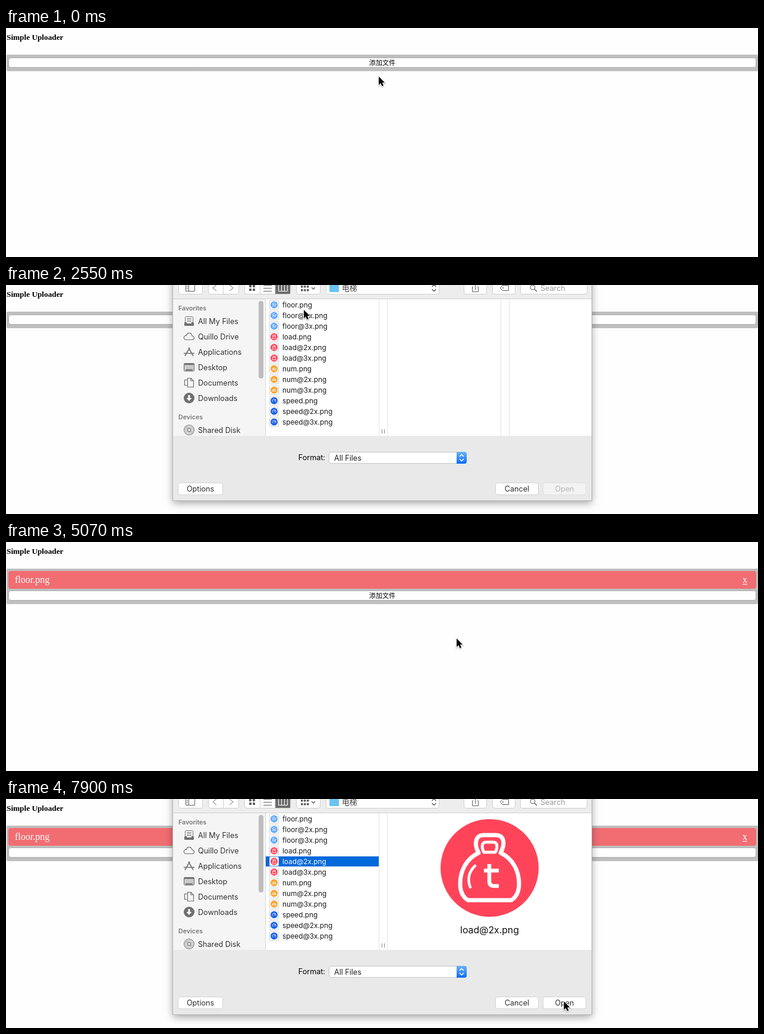
Animation of 1265x387 px, one loop 8000 ms. Source, as an HTML page with a canvas:

```html
<!DOCTYPE html>
<html lang="en">
<head>
<meta charset="utf-8">
<title>Simple Uploader</title>
<style>
html, body { margin: 0; width: 100%; height: 100%; overflow: hidden; background: #fefefe; }
canvas { display: block; }
</style>
</head>
<body>
<canvas id="stage" width="1265" height="387"></canvas>
<script>
const ctx = document.getElementById('stage').getContext('2d');
const LOOP = 8000;
const UI = 'Inter, sans-serif', SERIF = '"Liberation Serif", serif', CJK = '"Noto Sans CJK SC", "Noto Sans CJK", sans-serif';
const BLUE = '#62a9fb', RED = '#ff4459', ORANGE = '#f5a532', NAVY = '#1e62e6';

const FILES = ['floor', 'load', 'num', 'speed'].flatMap((name, i) =>
  ['', '@2x', '@3x'].map(scale => ({ name: name + scale + '.png', color: [BLUE, RED, ORANGE, NAVY][i], kind: i })));

// Pointer tip: time, x, y
const POINTER = [
  [0, 627, 82], [450, 631, 64], [600, 632.5, 57],
  [2100, 620, 58], [2250, 560, 56], [2400, 508, 49], [2550, 501, 42], [2690, 495, 36],
  [3140, 530, 60], [3290, 690, 190], [3430, 860, 300], [3580, 944, 338], [3720, 935, 340],
  [4770, 915, 325], [4920, 850, 265], [5070, 758, 163], [5220, 665, 110], [5370, 639, 93],
  [6560, 625, 95], [6710, 560, 102], [6860, 505, 104],
  [7310, 530, 125], [7460, 680, 225], [7610, 850, 315], [7760, 944, 342], [7900, 938.5, 342]
];
// Dialog offset from rest; null while closed
const SHEET = [
  [0, null], [1500, -361], [1650, -118], [1800, 0], [4320, -150], [4470, -368], [4620, null],
  [5960, -361], [6110, -118], [6260, 0]
];
const at = (keys, t) => keys.findLast(k => k[0] <= t);
const within = (t, a, b) => t >= a && t < b;

function text(str, x, y, size, color, { font = UI, weight = 400, align = 'left' } = {}) {
  ctx.font = `${weight} ${size}px ${font}`;
  ctx.textAlign = align;
  ctx.fillStyle = color;
  ctx.fillText(str, x, y);
}

function rect(x, y, w, h, fill) {
  ctx.fillStyle = fill;
  ctx.fillRect(x, y, w, h);
}

function box(x, y, w, h, r, fill, stroke) {
  ctx.beginPath();
  ctx.roundRect(x, y, w, h, r);
  if (fill) { ctx.fillStyle = fill; ctx.fill(); }
  if (stroke) { ctx.strokeStyle = stroke; ctx.lineWidth = 1; ctx.stroke(); }
}

function disc(x, y, r, fill) {
  ctx.beginPath();
  ctx.arc(x, y, r, 0, Math.PI * 2);
  ctx.fillStyle = fill;
  ctx.fill();
}

function stroke(path, color, width = 1) {
  ctx.strokeStyle = color;
  ctx.lineWidth = width;
  ctx.stroke(new Path2D(path));
}

function shifted(x, y, draw, scale = 1) {
  ctx.save();
  ctx.translate(x, y);
  ctx.scale(scale, scale);
  draw();
  ctx.restore();
}

function vertical(y, h, ...colors) {
  const g = ctx.createLinearGradient(0, y, 0, y + h);
  colors.forEach((c, i) => g.addColorStop(i / (colors.length - 1), c));
  return g;
}

function chevrons(x, y, color) {
  stroke(`M${x - 3.5} ${y - 2}l3.5 -3.5l3.5 3.5M${x - 3.5} ${y + 2}l3.5 3.5l3.5 -3.5`, color, 1.5);
}

function page(blue, uploaded) {
  rect(0, 0, 1265, 387, '#fefefe');
  text('Simple Uploader', 1, 20, 13.28, '#000', { font: SERIF, weight: 700 });
  box(1, 45, 1264, uploaded ? 60 : 28, 2, '#bfbfbf');
  if (uploaded) {
    box(4, 49, 1258, 30, 4, '#f16d72');
    text('floor.png', 15, 69, 16, '#fff', { font: SERIF });
    text('x', 1239, 69, 16, '#fff', { font: SERIF });
    rect(1239, 71, 8, 1, '#fff');
  }
  const y = uploaded ? 82 : 50;
  const fill = blue ? vertical(y, 17, '#4b9dfb', '#1a7bfa', '#0059e4') : '#fff';
  box(4.5, y + .5, 1257, 16, 3.5, fill, blue ? '#1564d6' : '#b0b0b0');
  text('添加文件', 633, y + 13, 11.1, '#000', { font: CJK, align: 'center' });
}

function sidebarIcon(kind, y) {
  const c = '#6f6f6f';
  shifted(308, y, () => {
    if (kind === 0) {
      box(-6.5, -7.5, 13, 12, 1, '#fff', c);
      stroke('M-4 -4.5H4M-4 -2H4M-4 .5H4', c);
      box(-8, 2, 16, 6, 1, c);
      rect(-4, 2, 8, 2, '#f5f5f5');
    } else if (kind === 1) {
      stroke('M-5 5.5H5.5C10 5 9 -1 5 -1C4 -7 -4 -7 -4.5 -1.5C-10 -2 -10 5.5 -5 5.5Z', c, 1.2);
    } else if (kind === 2) {
      stroke('M-7 7L1 -7M-1 -7L7 7M-9 2.5H9', c, 1.6);
    } else if (kind === 3) {
      box(-8.5, -6.5, 17, 13, 1, '#c9c9c9', c);
      rect(-8, -6, 16, 2, c);
      stroke('M-6 4.5H6', c, 2);
    } else if (kind === 4) {
      stroke('M-7.5 -4.5H-2V4.5H-7.5Z', c, 1.2);
      ctx.fillStyle = '#f5f5f5';
      ctx.fill(new Path2D('M-2.5 -7.5H3L7.5 -3V7.5H-2.5Z'));
      stroke('M-2.5 -7.5H3L7.5 -3V7.5H-2.5ZM3 -7V-3H7', c, 1.2);
    } else if (kind === 5) {
      disc(0, 0, 9, c);
      stroke('M0 -5V1', '#fff', 3);
      ctx.fillStyle = '#fff';
      ctx.fill(new Path2D('M-4.5 0H4.5L0 5Z'));
    } else {
      disc(0, 0, 9, '#7d7d7d');
      disc(0, 0, 8, '#d2d2d2');
      stroke('M-6 -4L6 4M-4 -6L4 6', '#b4b4b4');
      disc(0, 0, 3.2, '#7d7d7d');
      disc(0, 0, 2, '#f3f3f3');
    }
  });
}

function sidebar() {
  rect(281, 24, 155, 231, '#f5f5f5');
  rect(436, 24, 1, 231, '#d6d6d6');
  const head = { weight: 600 };
  text('Favorites', 290, 43, 10.6, '#777', head);
  text('Devices', 290, 227, 10.6, '#777', head);
  ['All My Files', 'Quillo Drive', 'Applications', 'Desktop', 'Documents', 'Downloads', 'Shared Disk'].forEach((name, i) => {
    const y = i < 6 ? 61 + 26 * i : 245;
    sidebarIcon(i, y);
    text(name, 323, y + 5, 12.6, '#333');
  });
  box(425, 27, 8, 131, 4, '#bdbdbd');
}

function toolbar(active) {
  const ink = active ? '#606060' : '#b5b5b5', edge = active ? '#cfcfcf' : '#dedede';
  const face = active ? '#fff' : '#f7f7f7';
  rect(281, -12, 704, 35, active ? '#ededed' : '#f6f6f6');
  rect(281, 23, 704, 1, '#d0d0d0');
  [[290, 40], [340, 51], [401, 77], [488, 40], [538, 190], [770, 38], [818, 38], [865, 112]]
    .forEach(([x, w]) => box(x + .5, -6.5, w, 22, 3.5, face, edge));
  rect(453, -6, 25, 21, active ? '#6c6c6c' : '#e2e2e2');
  stroke('M365.5 -6V15M427.5 -6V15', edge);
  stroke('M302.5 -1.5H317.5V10.5H302.5ZM307.5 -1V10M304 2.5H306M304 5.5H306', ink);
  stroke('M354 0L348 5L354 10M376 0L382 5L376 10', active ? '#a5a5a5' : ink, 1.4);
  for (const x of [409, 415]) for (const y of [0, 6]) rect(x, y, 4, 4, ink);
  stroke('M433 .5H447M433 5.5H447M433 10.5H447', ink);
  stroke('M458.5 -.5H473.5V10.5H458.5ZM463.5 0V10M468.5 0V10', active ? '#fff' : ink);
  for (const x of [496, 501, 506]) for (const y of [1, 7]) rect(x, y, 3.5, 3.5, ink);
  stroke('M514 4l3 3l3 -3', ink, 1.4);
  box(544, -2, 7, 5, 1, '#4fb3e6');
  box(544, 0, 16, 12, 1, active ? '#69c4f2' : '#79cbf4');
  text('电梯', 565, 10, 12.8, active ? '#444' : '#a0a0a0', { font: CJK });
  chevrons(720, 5, ink);
  stroke('M786 3H784.5V11.5H794.5V3H793M789.5 8V-3M786.5 0l3 -3l3 3', ink);
  stroke('M831.5 5L835 .5H845.5V9.5H835Z', ink);
  disc(836, 5, 1, ink);
  ctx.beginPath();
  ctx.arc(886, 4, 4, 0, 7);
  ctx.stroke();
  stroke('M889 7l4 4', ink, 1.5);
  text('Search', 899, 10, 12.6, active ? '#999' : '#bdbdbd');
}

function fileIcon(file, y) {
  box(443.5, y - 7.5, 15, 15, 1, '#fff', '#cfcfcf');
  disc(451, y, 6, file.color);
  const marks = ['M-2 3V-3H1M-2 0H1M4 -1H2V2H0', 'M-2 -1V-3H2V-1L3 3H-3L-2 -1H2', 'M-3 2V0H3V2ZM-1.5 -1.5H1.5', 'M-2.5 2A3 3 0 1 1 2.5 2M0 1L2 -2'];
  shifted(451, y, () => stroke(marks[file.kind], 'rgba(255,255,255,.8)', 1));
}

function floorArt() {
  const path = 'M823 63H785V138M785 99H820M878 97H843V132H804V169H768';
  disc(813.5, 116.5, 82.5, BLUE);
  ctx.lineJoin = 'miter';
  stroke(path, 'rgba(255,255,255,.25)', 12);
  stroke(path, 'rgba(255,255,255,.55)', 8);
  stroke(path, '#fff', 4.5);
}

function loadArt() {
  disc(813.5, 116.5, 82.5, RED);
  ctx.lineJoin = ctx.lineCap = 'round';
  stroke('M795 91C786 74 791 61 803 61H824C837 61 841 74 832 91C853 101 863 122 863 143C863 157 858 166 850 171H777C769 166 764 157 764 143C764 122 774 101 795 91Z', '#fff', 7);
  stroke('M804 90C799 81 801 73 807 73H820C826 73 828 81 823 90Z', '#fff', 5);
  stroke('M789 113C778 123 776 137 781 149', '#fff', 4.5);
  ctx.lineCap = 'butt';
  stroke('M813 110V139Q813 147 821 147H829M804 121H829', '#fff', 6.5);
}

function browser(active, selected) {
  rect(437, 24, 548, 231, '#fff');
  const hasFile = selected >= 0;
  (hasFile ? [627, 641] : [627, 641, 832, 846]).forEach(x => rect(x, 24, 1, 231, '#e4e4e4'));
  rect(632, 244, 1, 7, '#858585');
  rect(636, 244, 1, 7, '#858585');
  if (!active) return;
  FILES.forEach((file, i) => {
    const y = 33.5 + 18 * i;
    if (i === selected) rect(437, y - 8.5, 190, 17, '#0068da');
    fileIcon(file, y);
    text(file.name, 465, y + 4.5, 11.8, i === selected ? '#fff' : '#1c1c1c');
  });
  if (hasFile) {
    ctx.save();
    (selected ? loadArt : floorArt)();
    ctx.restore();
    text(FILES[selected].name, 813.5, 227, 15.8, '#111', { align: 'center' });
  }
}

function button(label, x, w, enabled, pressed) {
  box(x + .5, 334.5, w, 20, 3.5, pressed ? '#e1e1e1' : enabled ? '#fff' : '#f3f3f3', pressed ? '#dadada' : enabled ? '#d4d4d4' : '#e0e0e0');
  text(label, x + w / 2 + .5, 349, 12.6, enabled ? '#2c2c2c' : '#b5b5b5', { align: 'center' });
}

function dialog(offset, active, selected, pressed) {
  shifted(0, offset, () => {
    ctx.save();
    ctx.shadowColor = 'rgba(0,0,0,.38)';
    ctx.shadowBlur = 13;
    ctx.shadowOffsetY = 4;
    rect(281, -60, 704, 424, '#e9e9e9');
    ctx.restore();
    sidebar();
    browser(active, selected);
    rect(281, 255, 704, 109, '#e9e9e9');
    toolbar(active);
    ctx.strokeStyle = '#b4b4b4';
    ctx.lineWidth = 1;
    ctx.strokeRect(280.5, -60.5, 705, 425);

    text('Format:', 537, 296, 12.6, '#000', { align: 'right' });
    box(543.5, 282.5, 231, 19, 3.5, '#fff', '#c6c6c6');
    text('All Files', 552, 297, 12.6, '#222');
    if (active) box(758, 282, 17, 20, [0, 4, 4, 0], vertical(282, 20, '#6bb2fa', '#0a6df5'));
    chevrons(766.5, 292, active ? '#fff' : '#444');
    button('Options', 289, 75, active);
    button('Cancel', 823, 72, active);
    button('Open', 903, 72, active && selected >= 0, pressed);
  });
}

function pointer(x, y) {
  const arrow = new Path2D('M0 0V14.2L3.2 11.2L5.5 16.3L8 15.2L5.8 10.3H10.2Z');
  shifted(x, y, () => {
    ctx.save();
    ctx.shadowColor = 'rgba(0,0,0,.35)';
    ctx.shadowBlur = 2;
    ctx.shadowOffsetY = 1;
    ctx.strokeStyle = '#fff';
    ctx.lineWidth = 2;
    ctx.stroke(arrow);
    ctx.restore();
    ctx.fillStyle = '#000';
    ctx.fill(arrow);
  });
}

function render(t) {
  const blue = within(t, 1200, 1950) || within(t, 5660, 6410);
  const active = within(t, 1950, 4620) || t >= 6410;
  const selected = within(t, 2990, 4620) ? 0 : t >= 7160 ? 4 : -1;
  const offset = at(SHEET, t)[1];
  page(blue, t >= 4620);
  if (offset !== null) dialog(offset, active, selected, within(t, 4170, 4620));
  const [, x, y] = at(POINTER, t);
  pointer(x, y);
}

const start = performance.now();
function tick() {
  render((performance.now() - start) % LOOP);
  requestAnimationFrame(tick);
}
tick();
</script>
</body>
</html>
```
